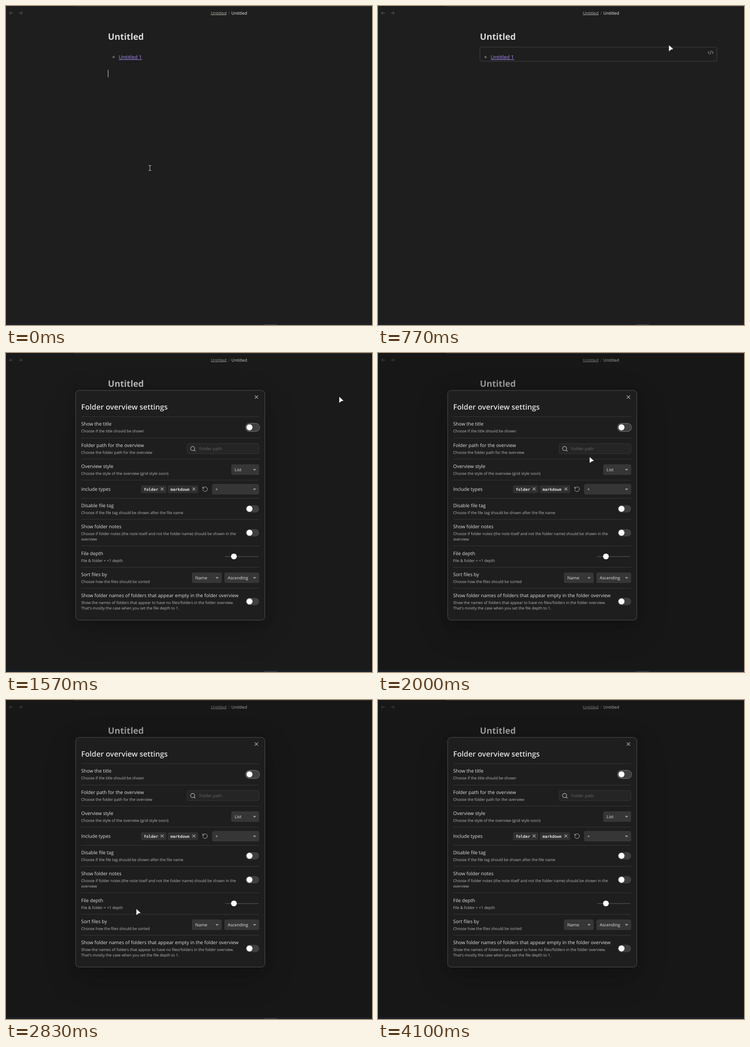
Animation of 801 by 699 pixels, one loop 4160 ms. Source, as an HTML page with a canvas:

```html
<!DOCTYPE html>
<html lang="en">
<head>
<meta charset="utf-8">
<title>Folder overview settings</title>
<style>
html, body { margin: 0; width: 100%; height: 100%; overflow: hidden; background: #1e1e1e; }
canvas { display: block; }
</style>
</head>
<body>
<canvas id="stage" width="801" height="699"></canvas>
<script>
const ctx = document.getElementById('stage').getContext('2d');
const LOOP = 4160;
const SANS = '"Open Sans", "Noto Sans", sans-serif';
const MONO = '"DejaVu Sans Mono", monospace';
const TEXT = '#e2e2e2', MUTED = '#bcbcbc', LINE = '#363636';

const HOVER_AT = 520, BUTTON_AT = 1080, MODAL_AT = 1570, MODAL_FULL_AT = 1630;
const CURSOR_GONE_AT = 3690, TASK_GONE_AT = 4100;

// Pointer strokes as [time, x, y]; it rests between strokes.
const strokes = [
  [[70, 315, 355], [200, 350, 308], [400, 458, 180], [570, 556, 110],
   [770, 636, 86], [930, 690, 85], [1100, 724, 94], [1270, 729, 96]],
  [[1830, 729, 96], [1910, 610, 140], [2000, 464, 227], [2150, 350, 355], [2330, 306, 441],
   [2400, 291, 466], [2520, 262, 499], [2610, 254, 504], [2830, 285, 458]],
  [[2970, 285, 458], [3130, 190, 540], [3330, 55, 646], [3470, 45, 671], [3670, 36, 698]]
];

function alongStroke(keys, t) {
  const last = keys.length - 1;
  if (t <= keys[0][0]) return keys[0].slice(1);
  if (t >= keys[last][0]) return keys[last].slice(1);
  let i = 0;
  while (t > keys[i + 1][0]) i++;
  const a = keys[i], b = keys[i + 1], span = b[0] - a[0], u = (t - a[0]) / span;
  const slope = (k, axis) => k === 0 || k === last ? 0 :
    (keys[k + 1][axis] - keys[k - 1][axis]) / (keys[k + 1][0] - keys[k - 1][0]);
  return [1, 2].map(axis =>
    a[axis] * (1 + 2 * u) * (1 - u) ** 2 + b[axis] * u * u * (3 - 2 * u) +
    span * (slope(i, axis) * u * (1 - u) ** 2 - slope(i + 1, axis) * u * u * (1 - u)));
}

function pointerAt(t) {
  const stroke = strokes.filter(s => s[0][0] <= t).pop() || strokes[0];
  return alongStroke(stroke, t);
}

function text(str, x, y, size, color = TEXT, weight = 400, family = SANS) {
  ctx.font = `${weight} ${size}px ${family}`;
  ctx.fillStyle = color;
  ctx.fillText(str, x, y);
}

function rect(x, y, w, h, color) {
  ctx.fillStyle = color;
  ctx.fillRect(x, y, w, h);
}

function round(x, y, w, h, r, fill, stroke, width = 1) {
  ctx.beginPath();
  ctx.roundRect(x, y, w, h, r);
  if (fill) { ctx.fillStyle = fill; ctx.fill(); }
  if (stroke) { ctx.strokeStyle = stroke; ctx.lineWidth = width; ctx.stroke(); }
}

function dot(x, y, r, color) {
  ctx.beginPath();
  ctx.arc(x, y, r, 0, Math.PI * 2);
  ctx.fillStyle = color;
  ctx.fill();
}

function strokePath(d, color, width = 1) {
  ctx.strokeStyle = color;
  ctx.lineWidth = width;
  ctx.stroke(new Path2D(d));
}

function cross(x, y, r, color) {
  strokePath(`M${x - r} ${y - r}L${x + r} ${y + r}M${x + r} ${y - r}L${x - r} ${y + r}`, color, 1.1);
}

function drawNote(t) {
  rect(0, 0, 801, 699, '#1e1e1e');
  strokePath('M15 15.5H7.5M10.8 12L7.5 15.5L10.8 19', '#666');
  strokePath('M28 15.5H35.5M32.2 12L35.5 15.5L32.2 19', '#666');
  text('Untitled', 448.3, 18.5, 9.2, '#bab3ab');
  rect(448.5, 19, 34, 1, '#8a847e');
  text('/', 486.7, 18.5, 9.2, '#666');
  text('Untitled', 493.3, 18.5, 9.2, '#f4f4f4');

  text('Untitled', 223, 74, 19.1, '#dadada', 700);
  dot(235.5, 112, 2.4, '#666');
  text('Untitled 1', 246.5, 115.5, 11.2, '#a68af9');
  rect(247, 117, 51, 1, '#a68af9');

  if (t < 430 || (t >= 930 && t < 1430)) rect(223, 140, 1, 16, '#dadada');
  if (t >= HOVER_AT && t < MODAL_AT) drawHoverBox(t);
}

function drawHoverBox(t) {
  round(223, 90, 518.5, 31, 3, null, '#424242');
  if (t >= BUTTON_AT) round(716, 93, 24, 19, 3.5, '#2c2c2c');
  strokePath('M725 99L722 102L725 105M731 99L734 102L731 105M729.2 97.8L726.8 106.2', MUTED);
}

function drawFrame(t) {
  rect(148, 0, 653, 1, '#3a3a3a');
  rect(800, 1, 1, 694, '#161616');
  rect(0, 695, 801, 4, '#1b2027');
  if (t < TASK_GONE_AT) round(565, 697, 28, 4, 1.5, '#34393f');
}

function toggle(y, focused) {
  round(524.6, y - 8.1, 29.4, 16.2, 8.1, '#3f3f3f');
  if (focused) round(524.2, y - 8.8, 30.8, 17.6, 8.8, null, '#666', 1.4);
  dot(532.9, y - 0.2, 6.6, '#fff');
}

function dropdown(x, y, w, label) {
  round(x, y, w, 23, 3.5, '#363636');
  text(label, x + 7.3, y + 15, 9.3);
  const cx = x + w - 10, cy = y + 10;
  ctx.fillStyle = '#999';
  ctx.fill(new Path2D(`M${cx - 3.5} ${cy}h7l-3.5 4z`));
}

function tag(x, w, label) {
  round(x, 290, w, 17, 3, '#303030');
  text(label, x + 6, 301.5, 8.7, TEXT, 700, MONO);
  cross(x + w - 9.3, 298, 3.2, MUTED);
}

// Each row: divider y, label y, label, then its description lines.
const rows = [
  [139, 159, 'Show the title', 'Choose if the title should be shown'],
  [186, 206, 'Folder path for the overview', 'Choose the folder path for the overview'],
  [232, 252, 'Overview style', 'Choose the style of the overview (grid style soon)'],
  [278, 302, 'Include types'],
  [318, 338, 'Disable file tag', 'Choose if the file tag should be shown after the file name'],
  [364, 384, 'Show folder notes',
    'Choose if folder notes (the note itself and not the folder name) should be shown in the', 'overview'],
  [422, 443, 'File depth', 'File & folder = +1 depth'],
  [469, 489, 'Sort files by', 'Choose how the files should be sorted'],
  [515, 535, 'Show folder names of folders that appear empty in the folder overview',
    'Show the names of folders that appear to have no files/folders in the folder overview.',
    "That's mostly the case when you set the file depth to 1."]
];

function drawModal() {
  for (const [blur, offset, alpha] of [[70, 22, 0.2], [20, 5, 0.11]]) {
    ctx.save();
    ctx.shadowColor = `rgba(0,0,0,${alpha})`;
    ctx.shadowBlur = blur;
    ctx.shadowOffsetY = offset;
    round(152, 82, 415, 504, 8, '#1e1e1e');
    ctx.restore();
  }
  round(152.5, 82, 414, 503.3, 8, '#1e1e1e', '#505050');
  cross(548, 96.5, 3.7, '#c0c0c0');
  text('Folder overview settings', 164.6, 124, 16.2, TEXT, 600);

  for (const [divider, y, label, ...lines] of rows) {
    rect(164.5, divider, 389.5, 1, LINE);
    text(label, 164.5, y, 10.46);
    lines.forEach((line, i) => text(line, 164.4, y + 15 + i * 12, 8.43, MUTED));
  }

  toggle(163, true);
  [341.5, 394, 544.5].forEach(y => toggle(y));

  round(396.5, 198.5, 157, 22, 3.5, '#252525', '#363636');
  strokePath('M412.9 209.3a4.5 4.5 0 1 1 -9 0a4.5 4.5 0 1 1 9 0M411.7 212.5L414.6 215.4', MUTED, 1.2);
  text('Folder path', 423, 213, 9.25, '#666');

  dropdown(493, 244, 61, 'List');
  tag(295.5, 55.5, 'folder');
  tag(354, 66.5, 'markdown');
  strokePath('M430.5 298.5a5.1 5.1 0 1 0 1.7 -3.9L430.4 296.3M430.4 293v3.4h3.4', MUTED);
  dropdown(451, 287, 103, '+');

  round(479, 445, 73.5, 2, 1, '#3f3f3f');
  dot(498.8, 445.8, 6.3, '#fff');
  dropdown(407, 481, 65, 'Name');
  dropdown(478, 481, 76, 'Ascending');
}

function drawPointer(t) {
  if (t >= CURSOR_GONE_AT) return;
  const [x, y] = pointerAt(t);
  ctx.save();
  ctx.translate(x, y);
  if (t < HOVER_AT) {
    strokePath('M-3 -5.5H-1L0 -4.8L1 -5.5H3M-3 5.5H-1L0 4.8L1 5.5H3M0 -5V5', '#c8c8c8', 1.1);
  } else {
    ctx.fillStyle = '#fff';
    ctx.fill(new Path2D('M0.4 0L9.6 8.4L5 9.6L0.4 13.2Z'));
  }
  ctx.restore();
}

function draw(t) {
  ctx.textRendering = 'geometricPrecision';
  drawNote(t);
  if (t >= MODAL_AT) {
    rect(0, 0, 801, 699, `rgba(7,7,7,${t < MODAL_FULL_AT ? 0.16 : 0.3})`);
    drawModal();
  }
  drawFrame(t);
  drawPointer(t);
}

const start = performance.now();
function tick() {
  draw((performance.now() - start) % LOOP);
  requestAnimationFrame(tick);
}
tick();
</script>
</body>
</html>
```
